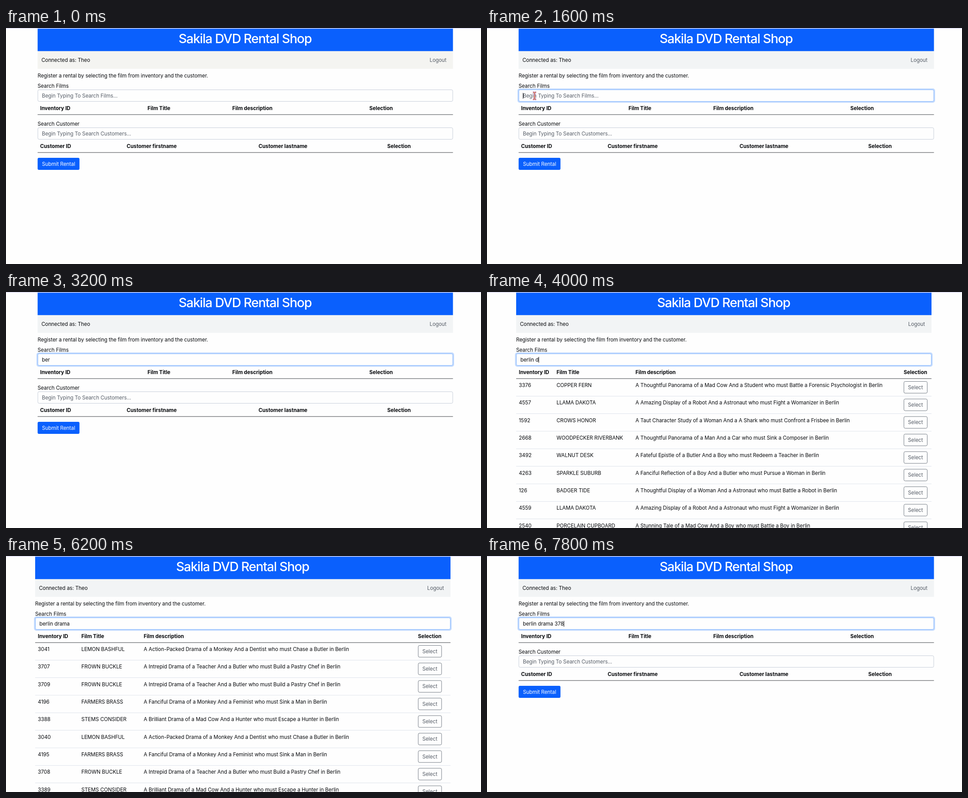
An HTML page for the animation above (8000 ms loop, 1059x529 px).

```html
<!DOCTYPE html>
<html lang="en">
<head>
<meta charset="utf-8">
<title>Rental form</title>
<style>
  html, body { margin: 0; width: 100%; height: 100%; overflow: hidden; background: #fefefe; }
  svg { display: block; width: 1059px; height: 529px; }
  text { font: 11.43px Inter, "Liberation Sans", sans-serif; letter-spacing: -.002em; fill: #07090c; white-space: pre; }
  .bold { font-weight: 700; letter-spacing: 0; }
  .title { font-size: 28.58px; font-weight: 500; letter-spacing: -.038em; fill: #fff; text-anchor: middle; }
  .mid { text-anchor: middle; }
  .grey { fill: #555c66; }
  .white { fill: #fff; }
</style>
</head>
<body>
<svg id="stage" viewBox="0 0 1059 529"></svg>
<script>
const LOOP = 8000, STEP = 200, ROW = 39.33, BLUE = '#0a60fd';
const LEFT = 70.5, WIDTH = 926, SHIFT = -5.5;
const stage = document.getElementById('stage');

const typing = [
  [2200, 'b'], [2400, 'be'], [2600, 'ber'], [3400, 'berl'], [3600, 'berlin'],
  [3800, 'berlin '], [4000, 'berlin d'], [4200, 'berlin dr'], [4400, 'berlin dra'],
  [4600, 'berlin dram'], [4800, 'berlin drama'], [7200, 'berlin drama '],
  [7400, 'berlin drama 3'], [7600, 'berlin drama 37'], [7800, 'berlin drama 378']
];
const FOCUS = 1400, FIRST_KEY = typing[0][0];

const llama = ['LLAMA DAKOTA', 'A Amazing Display of a Robot And a Astronaut who must Fight a Womanizer'];
const lemon = ['LEMON BASHFUL', 'A Action-Packed Drama of a Monkey And a Dentist who must Chase a Butler'];
const frown = ['FROWN BUCKLE', 'A Intrepid Drama of a Teacher And a Butler who must Build a Pastry Chef'];
const farmers = ['FARMERS BRASS', 'A Fanciful Drama of a Monkey And a Feminist who must Sink a Man'];
const stems = ['STEMS CONSIDER', 'A Brilliant Drama of a Mad Cow And a Hunter who must Escape a Hunter'];

const results = [
  { from: 4000, to: 5000, cols: [71, 155, 331, 929], rows: [
    [3376, 'COPPER FERN', 'A Thoughtful Panorama of a Mad Cow And a Student who must Battle a Forensic Psychologist'],
    [4557, ...llama],
    [1592, 'CROWS HONOR', 'A Taut Character Study of a Woman And a A Shark who must Confront a Frisbee'],
    [2668, 'WOODPECKER RIVERBANK', 'A Thoughtful Panorama of a Man And a Car who must Sink a Composer'],
    [3492, 'WALNUT DESK', 'A Fateful Epistle of a Butler And a Boy who must Redeem a Teacher'],
    [4263, 'SPARKLE SUBURB', 'A Fanciful Reflection of a Boy And a Butler who must Pursue a Woman'],
    [126, 'BADGER TIDE', 'A Thoughtful Display of a Woman And a Astronaut who must Battle a Robot'],
    [4559, ...llama],
    [2540, 'PORCELAIN CUPBOARD', 'A Stunning Tale of a Mad Cow And a Boy who must Battle a Boy']
  ] },
  { from: 5800, to: 7600, cols: [71, 168, 307, 918.6], rows: [
    [3041, ...lemon], [3707, ...frown], [3709, ...frown], [4196, ...farmers], [3388, ...stems],
    [3040, ...lemon], [4195, ...farmers], [3708, ...frown], [3389, ...stems]
  ] }
];

const text = (x, y, s, cls = '') => `<text x="${x}" y="${y}" class="${cls}">${s}</text>`;
const rect = (x, y, w, h, fill, extra = '') =>
  `<rect x="${x}" y="${y}" width="${w}" height="${h}" fill="${fill}" ${extra}/>`;
const heads = (xs, names, y) => names.map((n, i) => text(xs[i], y, n, 'bold')).join('');

function input(y, focused) {
  const ring = focused ? rect(LEFT - 2.5, y - 2.5, WIDTH + 5, 32, '#c2dafe', 'rx="5"') : '';
  return ring + rect(LEFT + .5, y + .5, WIDTH - 1, 26, '#fefefe',
    `rx="2.9" stroke="${focused ? '#86b7fe' : '#c6cdd9'}"`);
}

function resultTable({ cols, rows }) {
  const left = LEFT + SHIFT;
  return heads(cols, ['Inventory ID', 'Film Title', 'Film description', 'Selection'], 184) +
    rect(left, 193.6, WIDTH, 1, '#3c4045') +
    rows.map(([id, name, plot], i) => {
      const y = i * ROW;
      return text(cols[0], 213 + y, id) + text(cols[1], 213 + y, name) +
        text(cols[2], 213 + y, plot + ' in Berlin') +
        rect(cols[3] + .5, 200.5 + y, 52, 26.3, 'none', 'rx="2.9" stroke="#646c76" stroke-width=".9"') +
        text(cols[3] + 26.3, 217.8 + y, 'Select', 'mid grey') +
        rect(left, 233 + y, WIDTH, .8, '#d6dce6');
    }).join('');
}

function emptyTables() {
  return heads([76, 315.5, 504.5, 810], ['Inventory ID', 'Film Title', 'Film description', 'Selection'], 184) +
    rect(LEFT, 193.6, WIDTH, 1, '#3c4045') +
    text(LEFT, 219, 'Search Customer') + input(223, false) +
    text(80, 241, 'Begin Typing To Search Customers...', 'grey') +
    heads([76, 269, 563, 850], ['Customer ID', 'Customer firstname', 'Customer lastname', 'Selection'], 269) +
    rect(LEFT, 278.6, WIDTH, 1, '#3c4045') +
    rect(LEFT, 291, 93.3, 27, BLUE, 'rx="2.9"') + text(117.2, 309, 'Submit Rental', 'mid white');
}

function spinner(t) {
  const turn = 90 + (t - 5200) / 750 * 360;
  return `<path d="M3.5 3.5A5 5 0 1 1 3.5 -3.5" transform="translate(148 129.5) rotate(${turn})"
    fill="none" stroke="#d3d3d6" stroke-width="2"/>`;
}

// Pointer glides up to the field, becomes an I-beam there and hides on typing.
function pointer(t) {
  if (t < 600 || t >= FIRST_KEY) return '';
  const p = Math.min(1, (t - 600) / 600), ease = p * p * (3 - 2 * p);
  const x = 58 + 48 * ease, y = 497 - 345 * ease;
  const arrow = p < 1;
  const shape = arrow ? 'M0 0V14L3.5 11L6 17L8 16L5.5 10.5H10Z'
    : 'M-3.5 -8Q0 -8 0 -5V5Q0 8 -3.5 8M3.5 -8Q0 -8 0 -5V5Q0 8 3.5 8M-2 2H2';
  const line = (color, w) =>
    `<path d="${shape}" fill="${arrow ? '#e39a55' : 'none'}" stroke="${color}" stroke-width="${w}"/>`;
  return `<g transform="translate(${x} ${y})">${line('#b064b4', arrow ? 1.6 : 3.4)}${arrow ? '' : line('#e39a55', 1.3)}</g>`;
}

function draw(t) {
  const table = results.find(r => t >= r.from && t < r.to);
  const focused = t >= FOCUS;
  const [edited, typed] = typing.filter(k => k[0] <= t).pop() || [FOCUS, ''];
  const busy = t >= 5000 && t < 5800;

  stage.innerHTML =
    `<g transform="translate(${table ? SHIFT : 0} 0)">` +
    rect(LEFT, 51, WIDTH, 40.5, t < STEP ? '#f4f4f1' : '#f2f4f5') +
    rect(LEFT, 1.5, WIDTH, 50.3, BLUE) + text(533, 34, 'Sakila DVD Rental Shop', 'title') +
    text(79, 76.3, 'Connected as: Theo') + text(944.5, 76.3, 'Logout', 'grey') +
    text(LEFT, 110.8, 'Register a rental by selecting the film from inventory and the customer.') +
    text(LEFT, 133.5, 'Search Films') + (busy ? spinner(t) : '') +
    input(138, focused) +
    `<text id="query" x="80" y="156" class="${typed ? '' : 'grey'}">${typed || 'Begin Typing To Search Films...'}</text>` +
    '<rect id="caret" y="145.5" width="1" height="13" fill="#07090c"/></g>' +
    (table ? resultTable(table) : emptyTables()) +
    rect(0, 0, 1059, 1, '#cdccee') + pointer(t);

  const caret = document.getElementById('caret');
  const width = typed ? document.getElementById('query').getComputedTextLength() : 0;
  caret.setAttribute('x', 80 + width);
  caret.setAttribute('opacity', focused && (t - edited) % 900 < 500 ? 1 : 0);
}

let start, shown = -1;
function frame(now) {
  start ??= now;
  const t = Math.floor((now - start) % LOOP / STEP) * STEP;
  if (t !== shown) draw(shown = t);
  requestAnimationFrame(frame);
}
draw(0);
requestAnimationFrame(frame);
</script>
</body>
</html>
```
